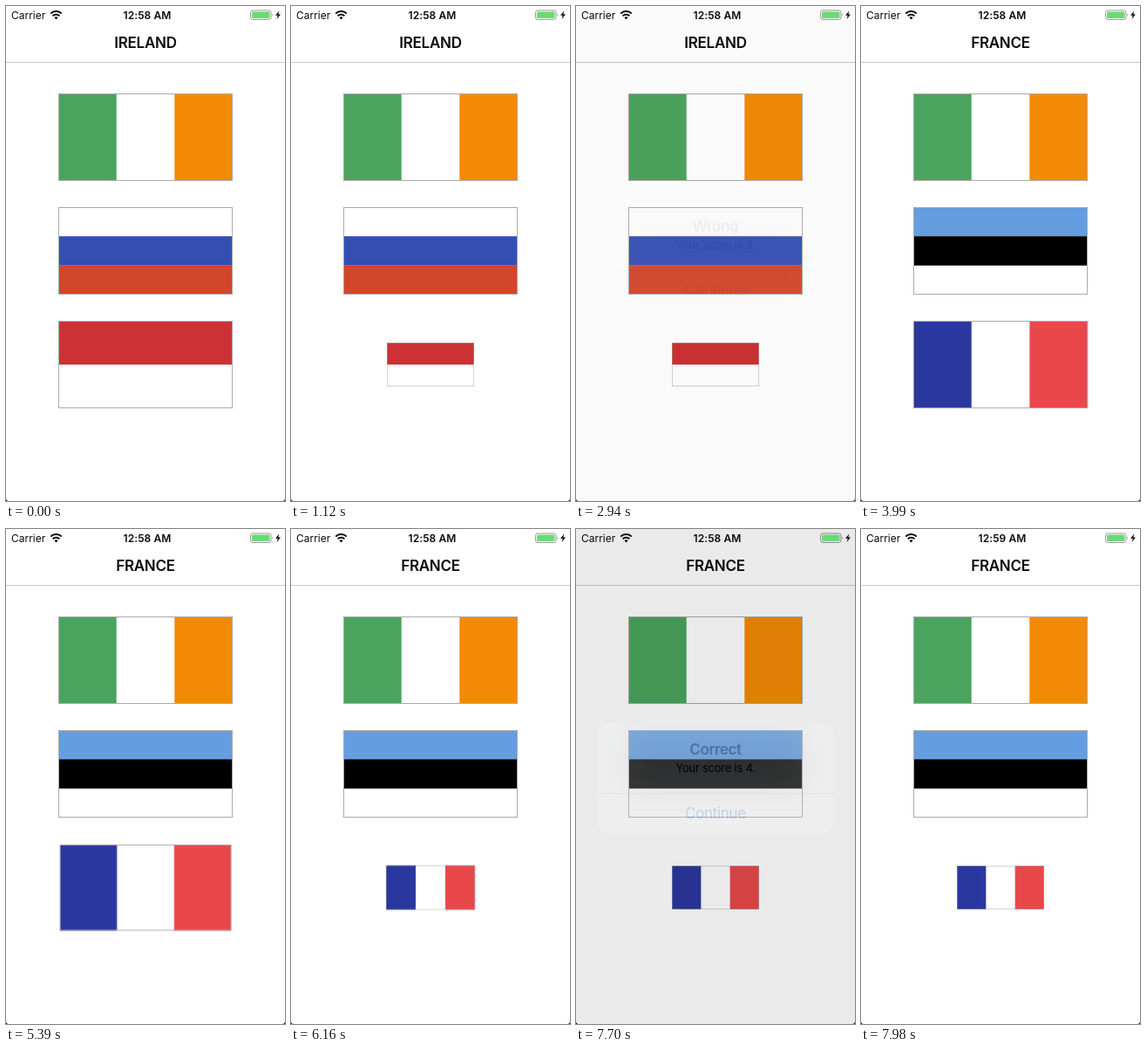
An HTML page that plays this animation: 320 by 566 pixels, repeating every 8000 ms.

```html
<!DOCTYPE html>
<html lang="en">
<head>
<meta charset="utf-8">
<title>Guess the flag</title>
<style>
  html, body { margin: 0; width: 100%; height: 100%; overflow: hidden; background: #fff; }
  svg { display: block; width: 100%; height: 100%; }
  text { font-family: Inter, Roboto, sans-serif; fill: #0b0b0c; }
  .mid { text-anchor: middle; }
  .title { font-size: 17px; font-weight: 600; letter-spacing: -.25px; }
  .head { font-size: 17px; font-weight: 600; letter-spacing: -.4px; }
  .note { font-size: 13px; letter-spacing: -.25px; }
  .action { font-size: 17px; letter-spacing: -.3px; fill: #3b82e8; }
  .status { font-size: 12px; }
  .time { font-weight: 600; letter-spacing: .1px; }
  .border { fill: none; stroke: #aaa; }
  .tint { filter: blur(18px); }

  /* One 8 s cycle drives everything: 1% = 80 ms */
  .first, .second, .before, .after, .fade, .pop, .tapped, .press {
    animation: 8s linear infinite;
  }
  .first  { animation-name: first; animation-timing-function: step-end; }
  .second { animation-name: second; animation-timing-function: step-end; }
  .before { animation-name: before; animation-timing-function: step-end; }
  .after  { animation-name: after; animation-timing-function: step-end; }
  .press  { animation-name: press; animation-timing-function: step-end; }
  .fade   { animation-name: fade; }
  .pop    { animation-name: pop; transform-origin: 160px 284px; }
  .tapped { animation-name: tapped; transform-origin: 160px 410px; }

  @keyframes first  { 0% { visibility: visible } 39.375%, to { visibility: hidden } }
  @keyframes second { 0% { visibility: hidden } 39.375%, to { visibility: visible } }
  @keyframes before { 0% { visibility: visible } 98.875%, to { visibility: hidden } }
  @keyframes after  { 0% { visibility: hidden } 98.875%, to { visibility: visible } }

  @keyframes press {
    0%, 32.375%, 92.75%, to { opacity: 0 }
    31.5%, 91.875% { opacity: 1 }
    37.7% { opacity: 0 }
  }
  @keyframes fade {
    0%, 37.625%, 98%, to { opacity: 0 }
    17.125%, 81.875% { opacity: 0; animation-timing-function: cubic-bezier(.25, .6, .4, 1) }
    22.75%, 87.25% { opacity: 1 }
    32.375%, 92.75% { opacity: 1; animation-timing-function: ease-in-out }
  }
  @keyframes pop {
    0% { transform: scale(1.2) }
    17.125%, 81.875% { transform: scale(1.2); animation-timing-function: cubic-bezier(.2, .7, .3, 1) }
    22.75%, 38%, 87.25%, to { transform: none }
  }
  @keyframes tapped {
    0%, 3.49% { transform: scale(1) }
    3.5% { transform: scale(.935); animation-timing-function: cubic-bezier(.341, .311, .567, 1) }
    12.875% { transform: scale(.5) }
    39.375% {
      transform: scale(.5);
      /* spring, damping ratio .5 */
      animation-timing-function: linear(0, .189, .557, .89, 1.092, 1.162, 1.141, 1.084, 1.027, .989,
        .974, .976, .985, .994, 1.001, 1.004, 1.004, 1.002, 1, 1, 1);
    }
    51.875% { transform: scale(1) }
    65.8125% { transform: scale(1); animation-timing-function: ease-in-out }
    78.3125%, to { transform: scale(.5) }
  }
</style>
</head>
<body>
<svg viewBox="0 0 320 566" preserveAspectRatio="none">
  <defs>
    <path id="left" d="M0 0h66.7v100H0z"/>
    <path id="right" d="M133.3 0H200v100h-66.7z"/>
    <path id="top" d="M0 0h200v33.3H0z"/>
    <path id="middle" d="M0 33.3h200v33.4H0z"/>
    <path id="bottom" d="M0 66.7h200V100H0z"/>
    <rect id="border" class="border" x=".5" y=".5" width="199" height="99"/>
    <clipPath id="card"><rect x="25" y="222" width="270" height="125" rx="13"/></clipPath>
  </defs>

  <rect width="320" height="566" fill="#fff"/>
  <path d="M0 64.5h320" stroke="#c9c9cb"/>
  <text class="title mid first" x="160" y="48">IRELAND</text>
  <text class="title mid second" x="160" y="48">FRANCE</text>

  <g transform="translate(60 100)">
    <use href="#left" fill="#4aa45d"/>
    <use href="#right" fill="#f38a06"/>
    <use href="#border"/>
  </g>

  <g transform="translate(60 230)">
    <g class="first">
      <use href="#middle" fill="#344eb3"/>
      <use href="#bottom" fill="#d2462a"/>
    </g>
    <g class="second">
      <use href="#top" fill="#649ee0"/>
      <use href="#middle" fill="#000"/>
    </g>
    <use href="#border"/>
  </g>

  <g class="tapped">
    <g transform="translate(60 360)">
      <path class="first" d="M0 0h200v50H0z" fill="#cc3235"/>
      <g class="second">
        <use href="#left" fill="#2a379e"/>
        <use href="#right" fill="#e8484a"/>
      </g>
      <use href="#border"/>
    </g>
  </g>

  <rect class="fade" width="320" height="566" fill="#000" fill-opacity=".36"/>

  <g>
    <text class="status" x="6" y="14.5">Carrier</text>
    <g fill="none" stroke="#0b0b0c" stroke-width="2">
      <path d="M51.2 8.6a9 9 0 0 1 12.6 0M53.6 11.4a5.6 5.6 0 0 1 7.8 0"/>
      <path d="M57.5 15.4l-2-2.1a2.8 2.8 0 0 1 4 0z" fill="#0b0b0c" stroke="none"/>
    </g>
    <text class="status time mid before" x="162" y="14.5">12:58 AM</text>
    <text class="status time mid after" x="162" y="14.5">12:59 AM</text>
    <rect x="280.5" y="5" width="23.5" height="10.5" rx="2.7" fill="none" stroke="#000" stroke-opacity=".4"/>
    <rect x="282" y="6.5" width="20.5" height="7.5" rx="1.5" fill="#6bd975"/>
    <path d="M305 8.5q1.6 1.7 0 3.5z" fill="#000" fill-opacity=".45"/>
    <path d="M313.4 5.5l-4.4 5.2h2.7l-1.1 4.3 4.4-5.4h-2.7z" fill="#0b0b0c"/>
  </g>

  <g class="fade">
    <g class="pop">
      <g clip-path="url(#card)">
        <rect x="25" y="222" width="270" height="125" fill="#fff"/>
        <g class="tint first">
          <path d="M60 250h200v46H60z" fill="#cbd0f3"/>
          <path d="M60 296h200v34H60z" fill="#f7c1c5"/>
        </g>
        <g class="tint second">
          <path d="M60 226h200v37H60z" fill="#b9daf7"/>
          <path d="M60 263h200v34H60z" fill="#c5c5c5"/>
        </g>
        <rect class="press" x="25" y="303" width="270" height="44" fill="#000" fill-opacity=".08"/>
        <path d="M25 302.5h270" stroke="#3c3c43" stroke-opacity=".25"/>
      </g>
      <g class="first">
        <text class="head mid" x="160" y="258">Wrong</text>
        <text class="note mid" x="160" y="278">Your score is 3.</text>
      </g>
      <g class="second">
        <text class="head mid" x="160" y="258">Correct</text>
        <text class="note mid" x="160" y="278">Your score is 4.</text>
      </g>
      <text class="action mid" x="160" y="331">Continue</text>
    </g>
  </g>

  <path d="M0 563v3h3q-3 0-3-3M320 563v3h-3q3 0 3-3"/>
</svg>
</body>
</html>
```
